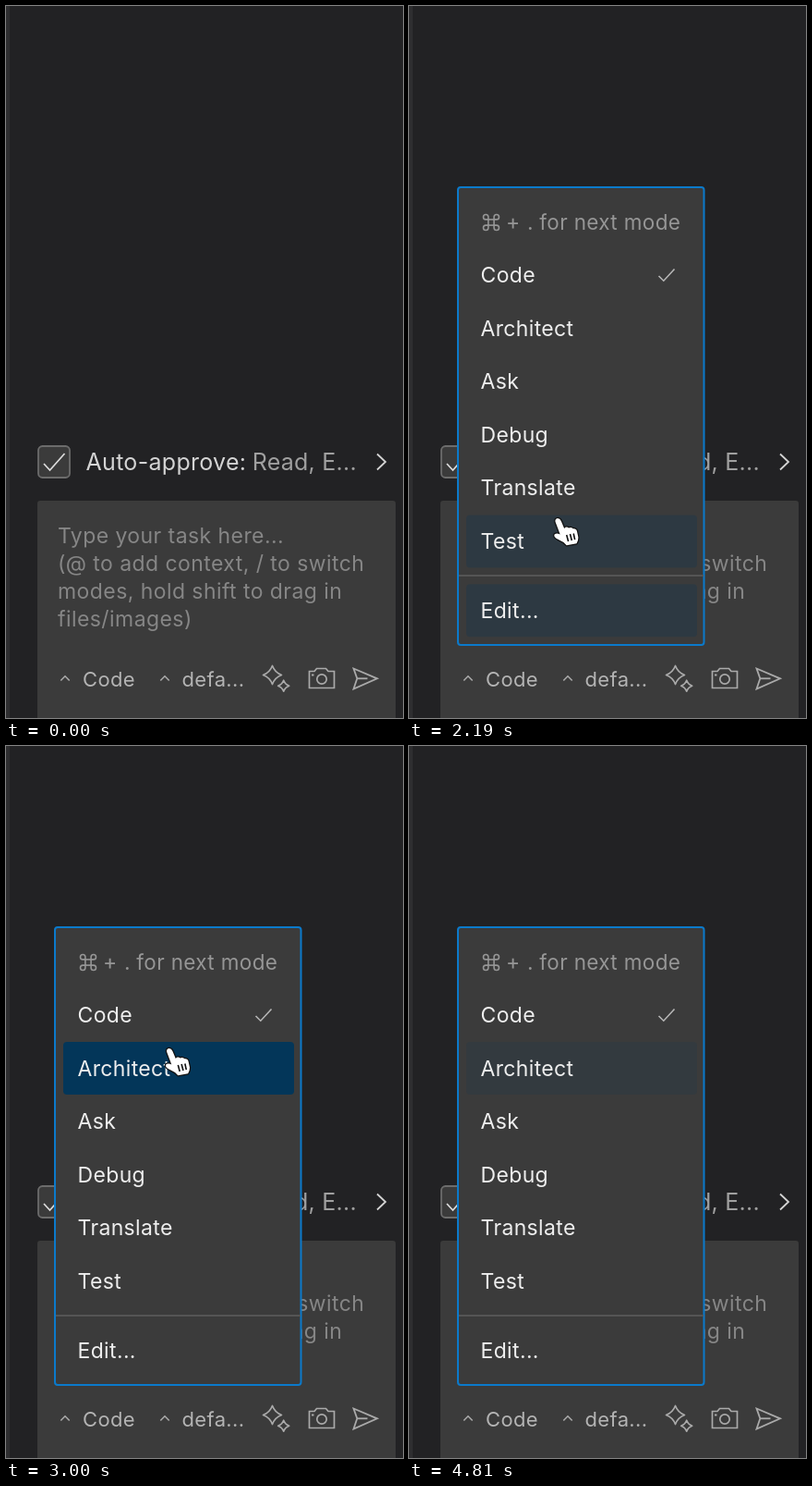
An HTML page with a canvas that plays this animation: 430 by 770 pixels, repeating every 4.87 s.

```html
<!DOCTYPE html>
<html lang="en">
<head>
<meta charset="utf-8">
<title>Mode menu</title>
<style>
html, body { margin: 0; width: 100%; height: 100%; overflow: hidden; background: #222224; }
canvas { display: block; }
</style>
</head>
<body>
<canvas id="stage" width="430" height="770"></canvas>
<script>
const ctx = document.getElementById('stage').getContext('2d');
const LOOP = 4870;
const FONT = 'Inter, "Open Sans", sans-serif';
const PANEL = '#3b3b3b';
const ICON = '#aaaaaa';

// Menu geometry
const MENU = { x: 53, y: 196, w: 266.5, h: 495 };
const ROW_TOP = 262.4, ROW_H = 57.6;
const ITEMS = ['Code', 'Architect', 'Ask', 'Debug', 'Translate', 'Test', 'Edit...'];
const rowY = i => ROW_TOP + ROW_H * i + (i === 6 ? 17.2 : 0);

// Timing
const ARROW_IN = 440, ARROW_STOP = 1440;
const OPEN = 1577, OPEN_TIME = 150;
const HIDE = 4682, FADE = 150;

// Pointer path over the menu: time, x, y
const PATH = [
  [2060, 99, 718], [2255, 186, 493], [2400, 189.5, 481.5], [2600, 190, 479],
  [2840, 179, 328], [3060, 178, 327], [3440, 161, 602], [3660, 160, 606],
  [4190, 174, 330]
];

const clamp = v => Math.max(0, Math.min(1, v));
const easeOut = (v, power = 3) => 1 - (1 - clamp(v)) ** power;

const slope = (i, k) => (PATH[i + 1][k] - PATH[i][k]) / (PATH[i + 1][0] - PATH[i][0]);

function tangent(i, k) {
  if (i === 0 || i === PATH.length - 1) return 0;
  const a = slope(i - 1, k), b = slope(i, k);
  return a * b > 0 ? 2 * a * b / (a + b) : 0;
}

// Monotone cubic through the path points
function along(t, k) {
  const last = PATH.length - 1;
  if (t <= PATH[0][0]) return PATH[0][k];
  if (t >= PATH[last][0]) return PATH[last][k];
  let i = 0;
  while (t > PATH[i + 1][0]) i++;
  const d = PATH[i + 1][0] - PATH[i][0];
  const u = (t - PATH[i][0]) / d, v = 1 - u;
  return v * v * (1 + 2 * u) * PATH[i][k] + u * v * v * d * tangent(i, k)
    + u * u * (3 - 2 * u) * PATH[i + 1][k] - u * u * v * d * tangent(i + 1, k);
}

function pointer(t) {
  if (t < ARROW_IN || t >= HIDE) return null;
  if (t < PATH[0][0]) {
    const p = easeOut((t - ARROW_IN) / (ARROW_STOP - ARROW_IN), 2.7);
    return { x: 288 - 189 * p, y: 505 + 213 * p };
  }
  return { x: along(t, 1), y: along(t, 2) };
}

function hoverRow(t) {
  const p = t > OPEN && pointer(t);
  if (!p) return -1;
  return ITEMS.findIndex((_, i) => p.y >= rowY(i) && p.y < rowY(i) + ROW_H);
}

// Share of the last FADE ms spent on each row
function highlights(t) {
  const share = ITEMS.map(() => 0), n = 30;
  for (let s = 0; s < n; s++) {
    const row = hoverRow(t - (s + 0.5) * FADE / n);
    if (row >= 0) share[row] += 1 / n;
  }
  return share;
}

function text(str, x, y, size, color, spacing = 0.35) {
  ctx.font = `${size}px ${FONT}`;
  ctx.letterSpacing = spacing + 'px';
  ctx.fillStyle = color;
  ctx.fillText(str, x, y);
}

function box(x, y, w, h, r, fill, stroke, width) {
  ctx.beginPath();
  ctx.roundRect(x, y, w, h, r);
  if (fill) { ctx.fillStyle = fill; ctx.fill(); }
  if (stroke) { ctx.strokeStyle = stroke; ctx.lineWidth = width; ctx.stroke(); }
}

function line(pts, color, width, close) {
  ctx.beginPath();
  pts.forEach(([x, y]) => ctx.lineTo(x, y));
  if (close) ctx.closePath();
  ctx.strokeStyle = color;
  ctx.lineWidth = width;
  ctx.stroke();
}

function shape(d, color, width) {
  ctx.strokeStyle = color;
  ctx.lineWidth = width;
  ctx.stroke(new Path2D(d));
}

function star(x, y, r) {
  const k = r * 0.27;
  ctx.beginPath();
  ctx.moveTo(x, y - r);
  [[1, 0], [0, 1], [-1, 0], [0, -1]].forEach(([a, b]) => {
    // The waist lies on the diagonal before each point
    const wx = a + b, wy = b - a;
    ctx.quadraticCurveTo(x + wx * k, y + wy * k, x + a * r, y + b * r);
  });
  ctx.closePath();
  ctx.lineJoin = 'round';
  ctx.strokeStyle = ICON;
  ctx.lineWidth = 1.7;
  ctx.stroke();
  ctx.lineJoin = 'miter';
}

function drawPanel() {
  ctx.fillStyle = '#222224';
  ctx.fillRect(0, 0, 430, 770);
  ctx.fillStyle = '#2e2e30';
  ctx.fillRect(0, 0, 4, 770);

  box(35, 476, 34, 34, 4.5, PANEL, '#6c6c6c', 1.8);
  line([[41, 495], [47.5, 502], [63.5, 484]], '#dcdcdc', 1.7);
  text('Auto-approve:', 86.5, 502, 25, '#d4d4d4', 0.3);
  text('Read, E...', 266.7, 502, 25, '#a0a0a0', 0.25);
  line([[402, 484.5], [411, 493], [402, 501.5]], '#d4d4d4', 1.8);

  box(34, 535, 388, 245, 3, PANEL);
  ['Type your task here...', '(@ to add context, / to switch',
    'modes, hold shift to drag in', 'files/images)']
    .forEach((row, i) => text(row, 56, 581 + 30 * i, 23, '#868686', 0.43));

  [[64, 84, 'Code'], [172, 191.5, 'defa...']].forEach(([cx, x, label]) => {
    line([[cx - 4.7, 729.5], [cx, 724.8], [cx + 4.7, 729.5]], ICON, 1.6);
    text(label, x - 1, 735.5, 22, '#b4b4b4');
  });
  drawIcons();
}

function drawIcons() {
  star(288.5, 723.5, 10);
  star(300.7, 735.2, 6);

  shape('M328.5 719.5H334L336.5 716.5H346.5L349 719.5H355.5V737.5H328.5Z', ICON, 1.7);
  ctx.beginPath();
  ctx.arc(342, 728, 5.2, 0, Math.PI * 2);
  ctx.stroke();
  ctx.fillStyle = ICON;
  ctx.fillRect(331, 722.5, 2.5, 2);

  line([[376.5, 716.5], [402, 727.3], [376.5, 738.5], [380.3, 727.3]], ICON, 1.8, true);
  line([[380.3, 727.3], [391.5, 727.3]], ICON, 1.8);
}

function commandKey(cx, cy, color) {
  const a = 3.1, r = 2.7;
  ctx.strokeStyle = color;
  ctx.lineWidth = 1.6;
  ctx.strokeRect(cx - a, cy - a, a * 2, a * 2);
  [[1, 1], [-1, 1], [-1, -1], [1, -1]].forEach(([sx, sy], i) => {
    ctx.beginPath();
    ctx.moveTo(cx + sx * a, cy + sy * a);
    ctx.arc(cx + sx * (a + r), cy + sy * (a + r), r,
      (i - 1) * Math.PI / 2, (i + 2) * Math.PI / 2);
    ctx.closePath();
    ctx.stroke();
  });
}

function drawMenu(t) {
  const p = easeOut((t - OPEN) / OPEN_TIME);
  if (p <= 0) return;
  const cx = MENU.x + MENU.w / 2, cy = MENU.y + MENU.h / 2, zoom = 0.95 + 0.05 * p;
  ctx.save();
  ctx.globalAlpha = p;
  ctx.translate(cx, cy);
  ctx.scale(zoom, zoom);
  ctx.translate(-cx, -cy);

  box(MENU.x, MENU.y, MENU.w, MENU.h, 3, PANEL, '#0b7acb', 2);
  commandKey(89, 234, '#969696');
  text('+ .', 105, 242, 23, '#969696', 0.6);
  text('for next mode', 141.3, 242, 22.5, '#969696');

  const glow = highlights(t);
  ITEMS.forEach((label, i) => {
    const y = rowY(i);
    if (glow[i] > 0) {
      ctx.globalAlpha = p * glow[i];
      box(62, y, 250, ROW_H - 0.6, 4, '#033659');
      ctx.globalAlpha = p;
    }
    text(label, 77.5, y + 36.6, 23, '#eeeeee');
  });
  line([[270.5, 292], [275.8, 297.2], [287.5, 284.5]], '#b6b6b6', 1.6);
  line([[54, 616], [319, 616]], '#555555', 2);
  ctx.restore();
}

const ARROW = new Path2D('M2.5 4V30L8.2 25L12 35L16 33.5L11.8 23.5H19.5Z');
const HAND = new Path2D('M-4.5 4Q-5 .5-2 0Q1 0 2.2 3L5.8 11.5Q8 9 11 11Q13.5 9.5 16 12'
  + 'Q19.5 11.5 20.5 15L22 22Q22 26 20 29L8.5 31Q5 27-1 24.5Q-7 21.5-5.5 18.5Q-3 16.5 1 18.5Z');
const CREASES = 'M8.5 19L10.5 26.5M12.5 18L14.5 25.5M16.5 17.5L18 24.5';

function drawPointer(t) {
  const p = pointer(t);
  if (!p) return;
  const hand = t > PATH[0][0] && p.y < 690;
  ctx.save();
  ctx.translate(p.x, p.y);
  if (hand) ctx.scale(0.94, 0.94);
  ctx.globalAlpha = clamp((t - ARROW_IN + 60) / 120);
  ctx.lineJoin = 'round';
  ctx.strokeStyle = hand ? '#111111' : '#ffffff';
  ctx.lineWidth = hand ? 2.6 : 5;
  ctx.stroke(hand ? HAND : ARROW);
  ctx.fillStyle = hand ? '#ffffff' : '#000000';
  ctx.fill(hand ? HAND : ARROW);
  if (hand) shape(CREASES, '#111111', 1.7);
  ctx.restore();
}

function frame(now) {
  const t = now % LOOP;
  drawPanel();
  drawMenu(t);
  drawPointer(t);
  requestAnimationFrame(frame);
}
frame(0);
</script>
</body>
</html>
```
